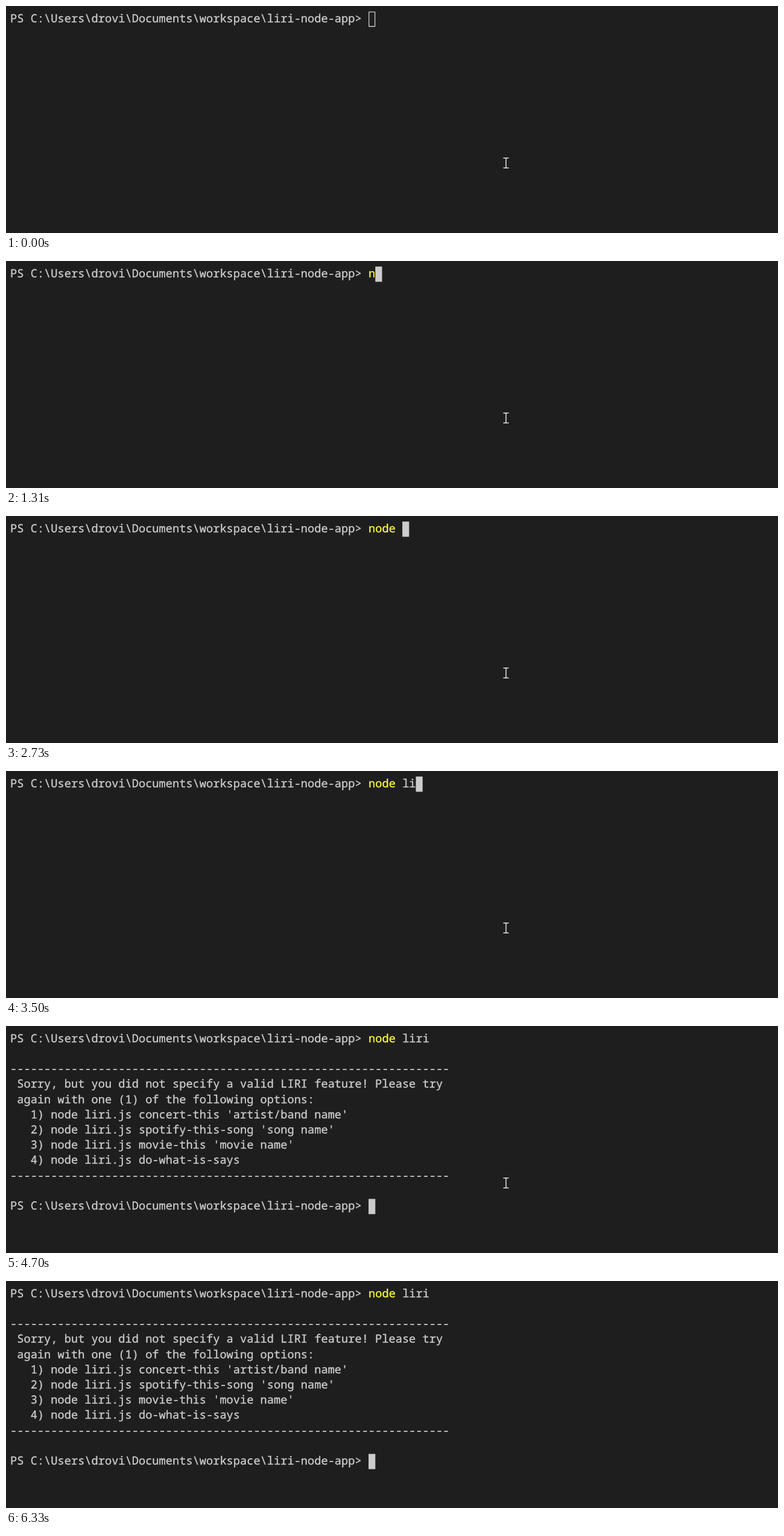
An HTML page with a canvas for the animation above (6990 ms loop, 1280 px wide and 376 px high).

```html
<!DOCTYPE html>
<html lang="en">
<head>
<meta charset="utf-8">
<title>Terminal session</title>
<style>
html, body { margin: 0; width: 100%; height: 100%; overflow: hidden; background: #1e1e1e; }
canvas { display: block; width: 1280px; height: 376px; }
</style>
</head>
<body>
<canvas id="stage" width="1280" height="376"></canvas>
<script>
const ctx = document.getElementById('stage').getContext('2d');

const LOOP = 6990;
const LEFT = 7.1, TOP = 9.2, COL = 11.208, ROW = 25.2, BASE = 17.6;
const FG = '#cccccc', BG = '#1e1e1e', YELLOW = '#f9f93c';

const PROMPT = 'PS C:\\Users\\drovi\\Documents\\workspace\\liri-node-app> ';
const COMMAND = 'node liri';
const KEYS = [1310, 1640, 1970, 2190, 2730, 3170, 3500, 3720, 3930];
const FOCUS = 320, ENTER = 4250, REPLY = 4700;

const RULE = '-'.repeat(65);
const OUTPUT = [
  RULE,
  ' Sorry, but you did not specify a valid LIRI feature! Please try',
  ' again with one (1) of the following options:',
  "   1) node liri.js concert-this 'artist/band name'",
  "   2) node liri.js spotify-this-song 'song name'",
  "   3) node liri.js movie-this 'movie name'",
  '   4) node liri.js do-what-is-says',
  RULE
];

// Pointer stops: start time, x, y
const POINTER = [[0, 829, 260], [320, 837, 265], [430, 829, 260], [6220, 807, 331], [6330, 807, 400]];

const colX = col => LEFT + col * COL;
const rowY = row => TOP + row * ROW;

// A hairline stroke gives the glyphs a slightly heavier weight
function print(text, col, row, color = FG) {
  const x = colX(col), y = rowY(row) + BASE;
  ctx.fillStyle = ctx.strokeStyle = color;
  ctx.lineWidth = 0.35;
  ctx.fillText(text, x, y);
  ctx.strokeText(text, x, y);
}

function cursor(col, row, focused) {
  const x = colX(col), y = rowY(row), line = 1.3;
  ctx.fillStyle = ctx.strokeStyle = FG;
  ctx.lineWidth = line;
  if (focused) ctx.fillRect(x, y, COL, ROW);
  else ctx.strokeRect(x + line / 2, y + line / 2, COL - line, ROW - line);
}

function pointer(t) {
  const [, x, y] = POINTER.filter(p => p[0] <= t).pop();
  const parts = [[-4.5, -9, 9, 1.5], [-4.5, 7.5, 9, 1.5], [-0.75, -9, 1.5, 18]];
  ctx.fillStyle = '#e4e4e4';
  for (const [dx, dy, w, h] of parts) ctx.fillRect(x + dx, y + dy, w, h);
}

function draw(t) {
  ctx.fillStyle = BG;
  ctx.fillRect(0, 0, 1280, 376);
  ctx.font = '18.68px "Noto Sans Mono", "DejaVu Sans Mono", monospace';
  ctx.textRendering = 'geometricPrecision';
  ctx.lineJoin = 'round';

  const typed = KEYS.filter(k => k <= t).length;
  const start = PROMPT.length;
  print(PROMPT, 0, 0);
  print(COMMAND.slice(0, Math.min(typed, 4)), start, 0, YELLOW);
  if (typed > 5) print(COMMAND.slice(5, typed), start + 5, 0);

  if (t >= REPLY) {
    OUTPUT.forEach((line, i) => print(line, 0, i + 2));
    print(PROMPT, 0, 11);
    cursor(start, 11, true);
  } else if (t >= ENTER) {
    cursor(0, 1, true);
  } else {
    cursor(start + typed, 0, t >= FOCUS);
  }
  pointer(t);
}

const begin = performance.now();
function tick() {
  draw((performance.now() - begin) % LOOP);
  requestAnimationFrame(tick);
}
tick();
</script>
</body>
</html>
```
